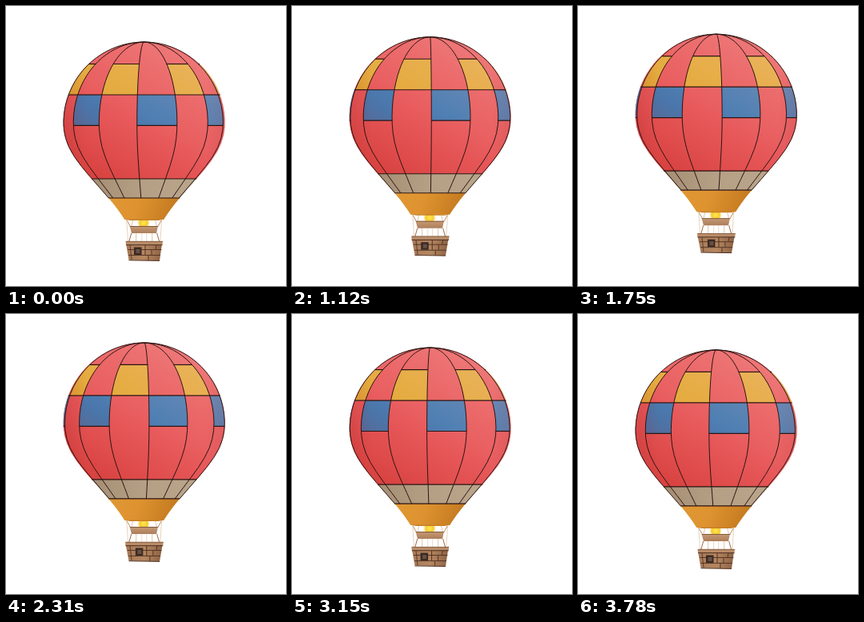
An HTML page with a canvas that plays this animation: 350x350 px, repeating every 3.85 s.

```html
<!DOCTYPE html>
<html lang="en">
<head>
<meta charset="utf-8">
<title>Hot air balloon</title>
<style>
  html, body { margin: 0; width: 100%; height: 100%; overflow: hidden; background: #fff; }
  canvas { display: block; width: 350px; height: 350px; }
</style>
</head>
<body>
<canvas id="stage" width="350" height="350"></canvas>
<script>
const ctx = document.getElementById('stage').getContext('2d');
const STEP = 70, STEPS = 55;
const CX = 172.7, MID = 146, R = 101, TOP = MID - R, MOUTH = 267;
const GORE = 360 / 16;
// Perspective: envelope radius over camera distance, and the last visible angle
const NEAR = .257, LIMIT = Math.acos(NEAR) * 180 / Math.PI;
const INK = '#2b1512', RED = '#e85a5c', YELLOW = '#e3aa38', BLUE = '#447bb3';

// Lower half of the envelope: height, radius, slope
const KNOTS = [[146, 101, 0], [180, 92.5, -.53], [216, 65.5, -.87], [240, 44.5, -.86], [267, 24.5, -.62]];

function radius(y) {
  if (y <= MID) return Math.sqrt(Math.max(0, R * R - (MID - y) ** 2));
  let i = 0;
  while (i < KNOTS.length - 2 && y > KNOTS[i + 1][0]) i++;
  const [y0, r0, m0] = KNOTS[i], [y1, r1, m1] = KNOTS[i + 1];
  const h = y1 - y0, u = (y - y0) / h, v = 1 - u;
  return v * v * (1 + 2 * u) * r0 + u * v * v * h * m0
       + u * u * (3 - 2 * u) * r1 - u * u * v * h * m1;
}

function project(angle, y) {
  const a = Math.max(-LIMIT, Math.min(LIMIT, angle)) * Math.PI / 180;
  return CX + radius(y) * Math.sqrt(1 - NEAR * NEAR) * Math.sin(a) / (1 - NEAR * Math.cos(a));
}

function meridian(a, from, to) {
  const n = 28;
  for (let i = 0; i <= n; i++) {
    const u = i / n;
    // Dense sampling near the crown
    const y = from + (to - from) * (from < to ? u * u : 1 - (1 - u) ** 2);
    ctx.lineTo(project(a, y), y);
  }
}

function panel(a0, a1, y0, y1, fill) {
  ctx.beginPath();
  meridian(a0, y0, y1);
  meridian(a1, y1, y0);
  ctx.closePath();
  ctx.fillStyle = fill;
  ctx.fill();
}

function line(x0, y0, x1, y1, color = INK, width = 1) {
  ctx.beginPath();
  ctx.moveTo(x0, y0);
  ctx.lineTo(x1, y1);
  ctx.strokeStyle = color;
  ctx.lineWidth = width;
  ctx.stroke();
}

function poly(points, fill) {
  ctx.beginPath();
  points.forEach(p => ctx.lineTo(...p));
  ctx.closePath();
  ctx.fillStyle = fill;
  ctx.fill();
}

function gradient(x0, y0, x1, y1, ...stops) {
  const g = ctx.createLinearGradient(x0, y0, x1, y1);
  stops.forEach(([at, color]) => g.addColorStop(at, color));
  return g;
}

const ring = (a0, a1, y) => line(project(a0, y), y, project(a1, y), y, INK, 1.2);

// Light from the upper right, deeper red towards the lower left
function shade() {
  panel(-90, 90, TOP, 216, gradient(220, 65, 130, 225,
    [0, 'rgba(255,205,200,.24)'], [.45, 'rgba(255,190,180,.06)'],
    [.6, 'rgba(190,20,10,.05)'], [1, 'rgba(180,15,5,.32)']));
  panel(-90, 90, TOP, 216, gradient(72, 0, 274, 0,
    [0, 'rgba(150,20,25,.14)'], [.14, 'rgba(150,20,25,0)'],
    [.88, 'rgba(150,20,25,0)'], [1, 'rgba(150,20,25,.12)']));
}

function envelope(turn) {
  panel(-90, 90, TOP, 217, RED);
  panel(-90, 90, 216, 240,
    gradient(107, 0, 238, 0, [0, '#a58e74'], [.5, '#b5a085'], [1, '#b9a58b']));
  panel(-90, 90, 240, MOUTH,
    gradient(130, 240, 205, 267, [0, '#e09733'], [.45, '#de9330'], [1, '#c57b20']));
  poly([[148.5, 266.5], [197, 266.5], [191, 268], [155, 268]], '#c98026');

  const gores = [];
  for (let k = -4; k <= 4; k++) {
    const a = turn + GORE * k;
    if (a + GORE > -LIMIT && a < LIMIT) gores.push([a, a + GORE, k % 2 !== 0]);
  }
  const rows = ([, , upper]) => upper ? [72.5, 111] : [111, 149.4];

  for (const g of gores) panel(g[0], g[1], ...rows(g), g[2] ? YELLOW : BLUE);
  shade();
  for (const g of gores) rows(g).forEach(y => ring(g[0], g[1], y));
  ring(-90, 90, 216);
  ring(-90, 90, 240);

  for (const [a] of gores) {
    if (a < -LIMIT) continue;
    ctx.beginPath();
    meridian(a, TOP, 240);
    ctx.strokeStyle = INK;
    ctx.lineWidth = 1;
    ctx.stroke();
  }
}

function rigging() {
  const glow = ctx.createRadialGradient(172, 271, 1, 172, 271, 8);
  glow.addColorStop(0, '#ffe34a');
  glow.addColorStop(.6, '#f7c92f');
  glow.addColorStop(1, 'rgba(255,225,120,0)');
  ctx.fillStyle = glow;
  ctx.fillRect(164, 266, 16, 10);

  for (const s of [-1, 1]) {
    line(CX + s * 22, 267, CX + s * 17, 276, '#b98a62', 1);
    line(CX + s * 22, 267, CX + s * 20, 295, '#e3c8aa', .8);
    line(CX + s * 14, 268, CX + s * 16, 276, '#d8b48f', .8);
    line(CX + s * 16, 284, CX + s * 19, 295, '#98694a', 1);
    line(CX + s * 10, 284, CX + s * 10, 295, '#d8b48f', .8);
    line(CX + s * 3, 284, CX + s * 3, 295, '#e5cbb0', .7);
  }
  poly([[154.5, 275], [190, 275], [188, 284], [157, 284]],
    gradient(0, 275, 0, 284, [0, '#c79a74'], [1, '#ac7e5b']));
  line(155, 275.5, 190, 275.5, '#70492f', .8);
}

function basket(p) {
  const d = 2 * p;
  const left = 150 - p * .5, right = 196 + p * .8;
  poly([[left, 297], [right - 1, 297], [192, 318.5], [153.5, 317.5]],
    gradient(150, 0, 196, 0, [0, '#a77a58'], [.5, '#b58761'], [1, '#8b6043']));

  const plank = '#4f2f20';
  line(152, 304.5, 194.5, 304.5, plank, .9);
  line(153, 311.5, 193, 311.5, plank, .9);
  line(174 + d, 299, 174 + d, 311, plank, 1);
  line(182 + d, 305, 182 + d, 311, plank, .9);
  line(178 + d, 312, 178 + d, 318, plank, .9);
  line(188 + d / 2, 299, 187 + d / 2, 304, plank, .9);
  line(155, 299, 157, 317, plank, .8);
  line(153.5, 317.8, 192, 318.4, plank, 1);
  ctx.fillStyle = '#3b2a23';
  ctx.fillRect(160 + d, 301.5, 9.5, 9.5);
  ctx.fillStyle = '#665046';
  ctx.fillRect(162.5 + d, 304, 5, 5);

  poly([[left - .5, 294], [right, 294], [right - .5, 298.5], [left, 298.5]], '#b98c68');
  line(left, 294.3, right, 294.3, '#7d533a', .8);
  line(left, 298.7, right - .5, 298.7, '#4b2d20', 1);
}

function draw(now) {
  const phase = Math.floor(now / STEP) % STEPS / STEPS;
  const p = Math.sin(Math.PI * phase) ** 2;
  ctx.clearRect(0, 0, 350, 350);
  ctx.save();
  ctx.translate(0, -10 * p);
  rigging();
  basket(p);
  envelope(-3.9 + 7.3 * p);
  ctx.restore();
}

function tick() {
  draw(performance.now());
  requestAnimationFrame(tick);
}
tick();
</script>
</body>
</html>
```
